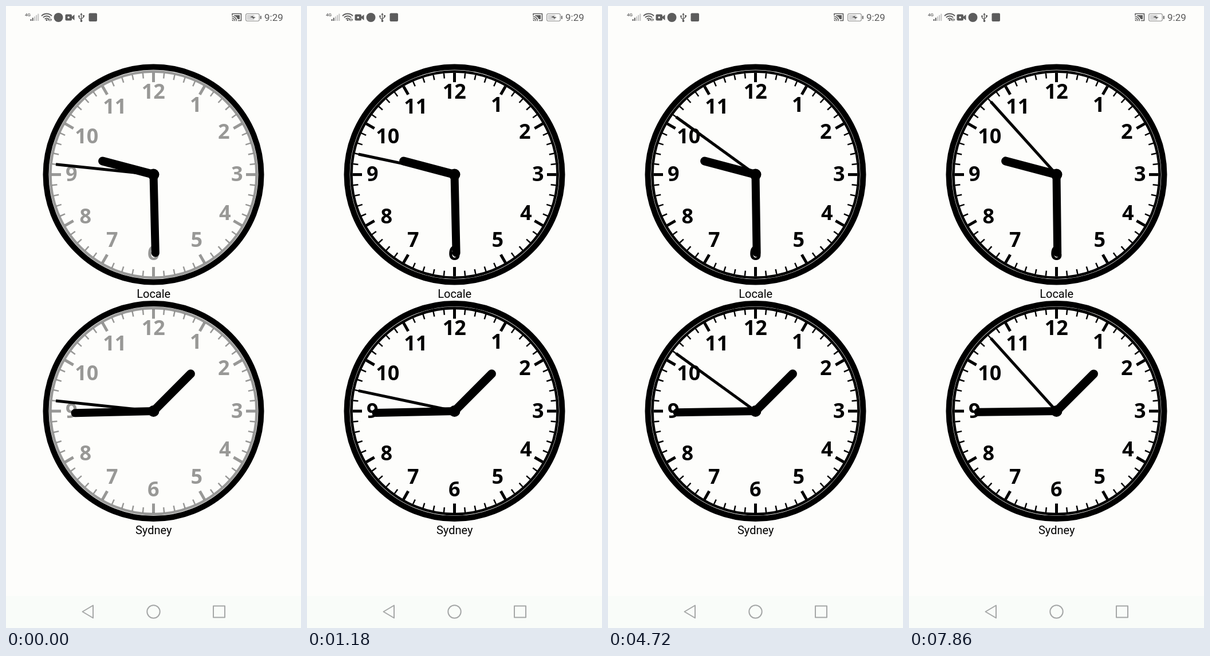
Animation, 515 px wide and 1087 px high, one loop 8000 ms. Source, as an HTML page with a canvas:

```html
<!DOCTYPE html>
<html lang="en">
<head>
<meta charset="utf-8">
<title>Two clocks</title>
<style>
html, body { margin: 0; width: 100%; height: 100%; overflow: hidden; background: #fdfdfb; }
canvas { display: block; width: 515px; height: 1087px; }
</style>
</head>
<body>
<canvas id="stage"></canvas>
<script>
const W = 515, H = 1087, LOOP = 8000, TAU = Math.PI * 2;
const canvas = document.getElementById('stage');
const ctx = canvas.getContext('2d');
const dpr = window.devicePixelRatio || 1;
canvas.width = W * dpr;
canvas.height = H * dpr;

const PAPER = '#fdfdfb', DARK = '#5c5c5c';
// Numeral centres relative to the dial centre, 1 to 12
const NUMERALS = [
  [72, -122.5], [123, -76], [146, -1.5], [124.5, 66], [75, 113.5], [0, 136],
  [-72.5, 113.5], [-118.5, 72.5], [-143, -1.5], [-116, -67.5], [-69.5, -119.5], [0.5, -146]
];
// Moments at which each second hand advances
const CLOCKS = [
  { y: 294.6, label: 'Locale', hour: 9, minute: 29, ticks: [980, 1970, 2940, 3930, 4720, 5700, 6880] },
  { y: 708, label: 'Sydney', hour: 1, minute: 44, ticks: [790, 1770, 2750, 3730, 4520, 5500, 6680] }
];

function line(x1, y1, x2, y2, width, color, cap = 'butt') {
  ctx.beginPath();
  ctx.moveTo(x1, y1);
  ctx.lineTo(x2, y2);
  ctx.lineWidth = width;
  ctx.strokeStyle = color;
  ctx.lineCap = cap;
  ctx.stroke();
}

function ring(x, y, r, width, color, from = 0, to = TAU) {
  ctx.beginPath();
  ctx.arc(x, y, r, from, to);
  ctx.lineWidth = width;
  ctx.strokeStyle = color;
  ctx.lineCap = 'butt';
  ctx.stroke();
}

function disc(x, y, r, color) {
  ctx.beginPath();
  ctx.arc(x, y, r, 0, TAU);
  ctx.fillStyle = color;
  ctx.fill();
}

function box(x, y, w, h, r, color) {
  ctx.beginPath();
  ctx.roundRect(x, y, w, h, r);
  ctx.fillStyle = color;
  ctx.fill();
}

function poly(points, color) {
  ctx.beginPath();
  points.forEach(([x, y]) => ctx.lineTo(x, y));
  ctx.closePath();
  ctx.fillStyle = color;
  ctx.fill();
}

function text(str, x, y, font, color, align = 'center') {
  ctx.font = font;
  ctx.fillStyle = color;
  ctx.textAlign = align;
  ctx.fillText(str, x, y);
}

// Centres the visible ink of a numeral on a point
function numeral(str, x, y, color) {
  ctx.font = '700 36px "Open Sans", "Noto Sans", sans-serif';
  ctx.textAlign = 'left';
  const m = ctx.measureText(str);
  ctx.fillStyle = color;
  ctx.fillText(str,
    x - (m.actualBoundingBoxRight - m.actualBoundingBoxLeft) / 2,
    y + (m.actualBoundingBoxAscent - m.actualBoundingBoxDescent) / 2);
}

function hand(deg, length, width, cap) {
  const a = deg * TAU / 360;
  line(0, 0, Math.sin(a) * length, -Math.cos(a) * length, width, '#000', cap);
}

function dial(color) {
  ring(0, 0, 180.1, 4.6, color);
  for (let i = 0; i < 60; i++) {
    const a = i * TAU / 60, s = Math.sin(a), c = Math.cos(a);
    const major = i % 5 === 0;
    const r = major ? 161.5 : 169;
    line(s * r, -c * r, s * 178, -c * 178, major ? 5 : 2.5, color);
  }
  NUMERALS.forEach(([x, y], i) => numeral(String(i + 1), x, y, color));
}

function clock(c, t, fade) {
  const sec = 46 + c.ticks.filter(at => t >= at).length;
  ctx.save();
  ctx.translate(257.5, c.y);
  ring(0, 0, 188, 10, '#000');
  dial(`rgba(0,0,0,${fade})`);
  hand(c.hour * 30 + (29 + sec / 60) / 2, 92, 15, 'round');
  hand((c.minute + sec / 60) * 6, 137, 14, 'round');
  hand(sec * 6, 171.4, 5, 'butt');
  disc(0, 0, 10, '#000');
  ctx.restore();
  text(c.label, 257.7, c.y + 214.9, '20px Roboto, sans-serif', '#000');
}

function camera(x) {
  box(x - 8, 14.5, 11.5, 11, 2, DARK);
  poly([[x + 3, 19], [x + 8, 15], [x + 8, 25], [x + 3, 21]], DARK);
  disc(x - 2.3, 20, 1.8, PAPER);
}

function usb() {
  line(131.5, 14, 131.5, 26, 1.3, DARK);
  poly([[129.3, 15.5], [131.5, 12], [133.7, 15.5]], DARK);
  disc(131.5, 26, 1.9, DARK);
  line(127.5, 18, 127.5, 21, 1.3, DARK);
  line(127.5, 20.5, 131.5, 24, 1.3, DARK);
  line(135.5, 17.5, 135.5, 20, 1.3, DARK);
  line(135.5, 19.5, 131.5, 22.5, 1.3, DARK);
  disc(127.5, 17.8, 1.5, DARK);
  box(134.2, 16, 2.8, 2.8, 0, DARK);
}

function statusBar(t) {
  text('4G', 38, 17.5, '500 8px Roboto, sans-serif', DARK);
  for (let i = 0; i < 5; i++) {
    const h = 3 + i * 2.4;
    box(42.5 + i * 3.2, 26 - h, 2, h, 0.5, i < 2 ? DARK : '#c4c4c4');
  }
  [4.5, 8.5, 12.5].forEach(r => ring(71, 26, r, 1.8, DARK, -TAU * 0.378, -TAU * 0.122));
  disc(71, 24.5, 1.6, DARK);
  poly([[73.5, 24], [76, 21], [76, 27]], DARK);
  poly([[80, 24], [77.5, 21], [77.5, 27]], DARK);

  const swapped = t >= 200;
  disc(swapped ? 111.5 : 91.5, 20, 8, DARK);
  camera(swapped ? 91.5 : 111.5);
  usb();
  box(144.5, 12.5, 14.5, 14.5, 2, DARK);

  // Cast
  ctx.beginPath();
  ctx.moveTo(395, 16.5);
  ctx.lineTo(395, 13.5);
  ctx.lineTo(410.5, 13.5);
  ctx.lineTo(410.5, 25.5);
  ctx.lineTo(405, 25.5);
  ctx.lineWidth = 1.6;
  ctx.strokeStyle = DARK;
  ctx.stroke();
  [2, 5, 8].forEach(r => ring(394.5, 26.3, r, 1.5, DARK, -TAU / 4, 0));
  poly([[398, 16], [408, 16], [408, 23], [404.5, 23], [402, 19], [398, 17]], DARK);

  // Battery
  ctx.beginPath();
  ctx.roundRect(418.7, 13.5, 23.5, 12.8, 2.5);
  ctx.lineWidth = 1.1;
  ctx.strokeStyle = '#888';
  ctx.stroke();
  box(420.5, 15.3, 13, 9.2, 1, '#d6d6d6');
  box(443.8, 17, 2, 6, 1, '#666');
  poly([[426, 19.3], [431, 17.5], [431, 19.2], [436, 19.8], [431, 22.3], [431, 20.6]], '#4c4c4c');
  text('9:29', 451, 26, '17px Roboto, sans-serif', '#595959', 'left');
}

function navBar() {
  const color = '#a5a7a7';
  box(0, 1031, W, 56, 0, '#f9fcf9');
  ctx.lineWidth = 2;
  ctx.strokeStyle = color;
  ctx.lineJoin = 'round';
  ctx.beginPath();
  ctx.moveTo(133.5, 1058.5);
  ctx.lineTo(152, 1047.5);
  ctx.lineTo(152, 1069.5);
  ctx.closePath();
  ctx.stroke();
  ctx.strokeRect(362, 1048.5, 20, 20);
  ring(257.5, 1058.5, 11.2, 2, color);
}

function draw() {
  const t = performance.now() % LOOP;
  const fade = t < 200 ? 0.4 : t < 390 ? 0.68 : t < 590 ? 0.91 : 1;
  ctx.setTransform(dpr, 0, 0, dpr, 0, 0);
  ctx.fillStyle = PAPER;
  ctx.fillRect(0, 0, W, H);
  statusBar(t);
  CLOCKS.forEach(c => clock(c, t, fade));
  navBar();
  requestAnimationFrame(draw);
}
draw();
</script>
</body>
</html>
```
